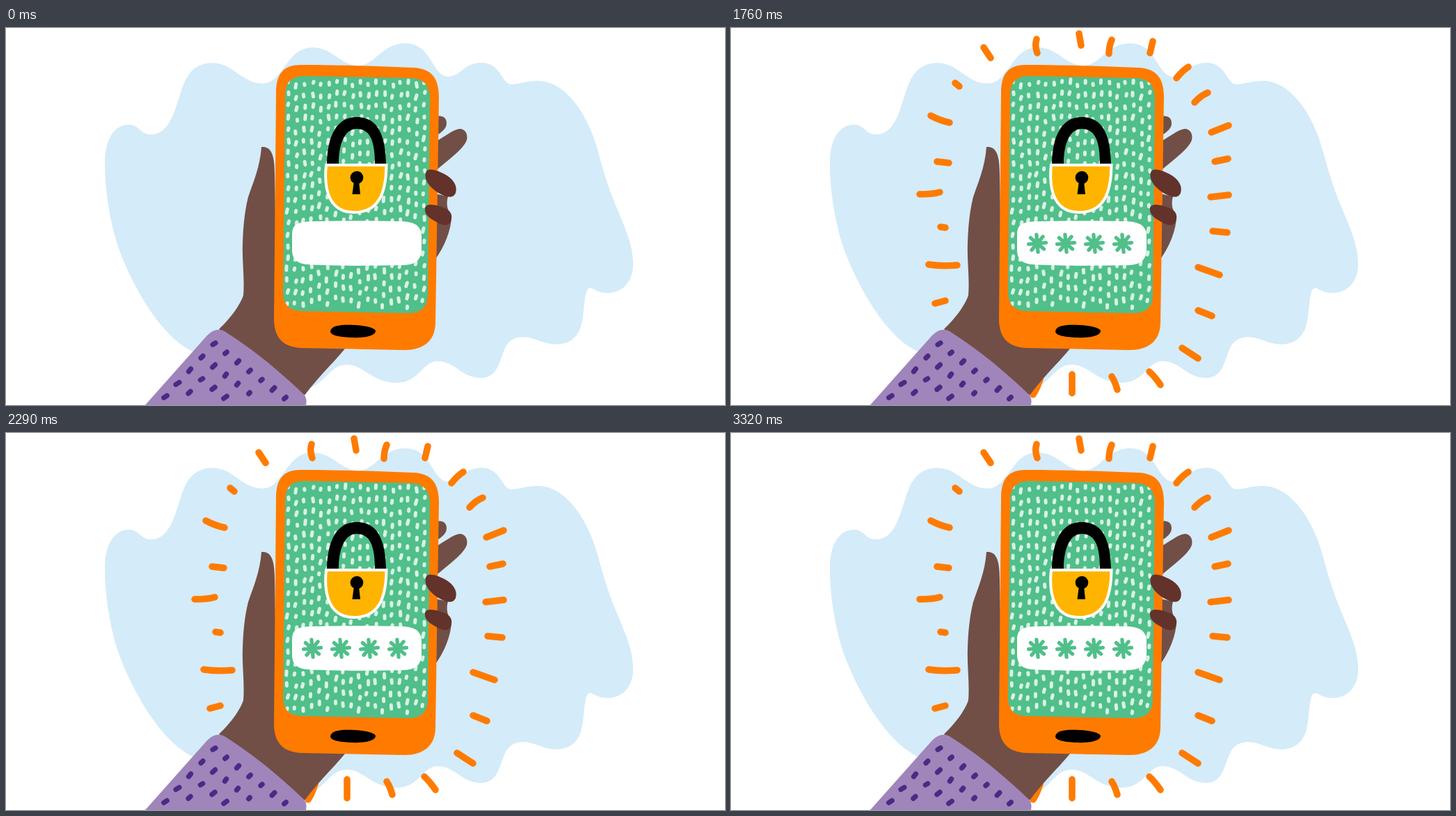
An HTML page for the animation above (4650 ms loop, 1033 by 542 pixels).

```html
<!DOCTYPE html>
<html lang="en">
<head>
<meta charset="utf-8">
<title>Phone lock</title>
<style>
html, body { margin: 0; width: 100%; height: 100%; overflow: hidden; background: #fff; }
svg { display: block; width: 100%; height: 100%; }
.line { fill: none; stroke-linecap: round; stroke-linejoin: round; }
</style>
</head>
<body>
<svg viewBox="0 0 1033 542">
  <defs>
    <path id="glass" d="M401 97Q401 69 428 69L583 72Q608 73 609 100L606 385Q605 410 578 410L424 407Q398 406 398 380Z"/>
    <clipPath id="clip"><use href="#glass"/></clipPath>
  </defs>

  <path fill="#d4ebf9" d="M142 195C142 160 155 140 175 139C192 138 192 153 208 153C245 153 245 90 262 68C275 47 305 45 325 60C340 70 355 83 375 79C400 72 405 28 440 28C470 28 480 54 507 54C530 54 540 22 574 22C612 22 612 70 636 70C655 68 658 50 683 50C712 50 712 82 727 81C745 79 750 76 765 76C807 77 838 130 850 175C859 209 866 230 874 250C888 285 901 310 901 340C901 365 885 381 865 381C848 381 845 373 838 374C829 377 832 415 825 432C815 457 790 458 770 451C752 444 730 438 718 458C708 478 708 503 682 503C655 503 645 479 620 479C598 479 595 509 562 510C525 510 515 484 489 484C465 484 460 512 430 520L268 465C215 440 172 350 158 305C148 270 142 230 142 195Z"/>

  <path id="rays" class="line" stroke="#ff7b00" stroke-width="9.5" opacity="0" d="
    M363 28l10 15M439 16q-3 10 1 20M500 8l3 17M547 17q-4 9-4 20M606 19l-4 17
    M657 56q-8 5-17 16M685 93q-10 4-19 14M715 140l-25 10M714 188l-19 4M715 240l-26 3
    M692 292l21 2M671 344l31 11M671 406l20 8M648 460l23 15M601 494q7 6 16 19
    M547 501q5 8 8 19M490 498v27M444 505q-4 13-10 22M293 396l15-4
    M284 340q21 3 41 1M301 286l7 1M271 239q19 0 29-3M296 192l17 2
    M287 126q13 7 27 10M322 79l6 5"/>

  <g fill="#714f46">
    <path d="M367 171C380 170 386 180 386 210L390 440L487 461C470 482 450 500 429 528L306 433C325 415 338 395 341 384C343 360 339 335 340 310C341 275 345 255 348 243C355 222 365 200 367 171Z"/>
    <path d="M618 127C627 125 633 129 633 137C633 144 627 149 618 155Z"/>
    <path d="M616 164C631 156 642 146 652 145C660 145 664 153 662 161C658 173 638 188 616 206Z"/>
    <path d="M615 238L635 242C632 254 634 262 640 270C640 290 630 315 615 335Z"/>
  </g>
  <path fill="#a085bb" d="M200 542L289 442Q303 428 317 438C355 462 395 495 428 527Q433 532 431 542Z"/>
  <path id="spots" class="line" stroke="#4b2a85" stroke-width="7.2"/>

  <path fill="#ff7b00" d="M388 94C388 65 399 53 424 53C480 53 530 55 585 57C611 58 622 72 622 99L617 425C616 450 600 463 572 463L425 460C398 459 385 445 385 418Z"/>
  <use href="#glass" fill="#50bf8a"/>
  <g clip-path="url(#clip)"><path id="dots" class="line" stroke="#d9f1e5" stroke-width="5"/></g>
  <path d="M466 436C467 428 480 426 500 427C520 428 531 432 531 436C530 442 518 446 495 445C478 444 466 442 466 436Z"/>

  <path d="M461 195C462 155 475 128 504 128C535 128 545 155 546 195L530 195C530 165 524 145 504 145C485 145 478 170 478 195Z"/>
  <path fill="#ffb400" stroke="#fff" stroke-width="4" d="M460 197L546.5 197C546 237 536 265 500 265C466 265 456 235 460 197Z"/>
  <circle cx="504" cy="215" r="9.3"/>
  <path d="M500 220L507 220L509 239L497.500 239Z"/>

  <path fill="#fff" d="M411 297C411 283 418 279 437 278C480 277 530 277 570 278C589 279 597 286 597 300L597 318C596 335 588 340 570 341C520 342 470 342 435 340C418 339 411 333 411 318Z"/>
  <g id="stars" class="line" stroke="#50bf8a" stroke-width="5.3"></g>

  <g fill="#62322b">
    <path d="M603 208C605 200 618 204 630 210C643 217 649 227 646 237C643 245 634 244 623 238C611 231 600 220 603 208Z"/>
    <path d="M602 259C603 252 615 253 628 258C640 262 642 270 639 278C636 286 626 284 617 278C608 273 601 268 602 259Z"/>
  </g>
</svg>
<script>
const LOOP = 4650, STEP = 30, FAINT = 0.02;
const byId = id => document.getElementById(id);
const range = n => [...Array(n).keys()];

// Short stroke centred on x, y
function dash(x, y, length, degrees) {
  const a = degrees * Math.PI / 180;
  const dx = Math.cos(a) * length / 2, dy = Math.sin(a) * length / 2;
  return `M${x - dx} ${y - dy}L${x + dx} ${y + dy}`;
}

let seed = 71;
function rand(low, high) {
  seed = seed * 16807 % 2147483647;
  return low + (high - low) * seed / 2147483647;
}

// Screen pattern: loose columns of upright dashes
let pattern = "";
for (const column of range(18)) {
  for (let y = rand(76, 84); y < 404; y += rand(15, 18.5)) {
    const x = 406 + column * 11.5 - (y - 76) / 150;
    pattern += dash(x + rand(-1.5, 1.5), y, rand(2, 6), rand(80, 108));
  }
}
byId("dots").setAttribute("d", pattern);

// Sleeve pattern: a slanted grid
let sleeve = "";
for (const column of range(7)) {
  for (const row of range(5)) {
    const x = 299 + column * 17 - row * 17.5, y = 454 + column * 13 + row * 19;
    if (y < 534) sleeve += dash(x, y, rand(2.5, 6), rand(-55, -30));
  }
}
byId("spots").setAttribute("d", sleeve);

const starTime = i => 200 + 370 * i;
const stars = range(4).map(i => {
  const star = document.createElementNS("http://www.w3.org/2000/svg", "path");
  const spokes = range(4).map(k => dash(440 + 41 * i, 309.7, 25, 45 * k - 5));
  star.setAttribute("d", spokes.join(""));
  byId("stars").append(star);
  return star;
});

function rayOpacity(t) {
  if (t < 1580) return 0;
  if (t < 1760) return Math.max(FAINT, Math.floor((t - 1580) / STEP) / 6);
  for (const start of [1960, 2990]) {
    const k = Math.floor((t - start) / STEP) + 1;
    if (k > 0 && k < 12) return Math.max(FAINT, Math.abs(1 - k / 6));
  }
  return 1;
}

const begin = performance.now();
function draw(now) {
  const t = Math.max(0, now - begin) % LOOP;
  stars.forEach((star, i) => star.setAttribute("visibility", t >= starTime(i) ? "visible" : "hidden"));
  byId("rays").setAttribute("opacity", rayOpacity(t));
  requestAnimationFrame(draw);
}
draw(begin);
</script>
</body>
</html>
```
